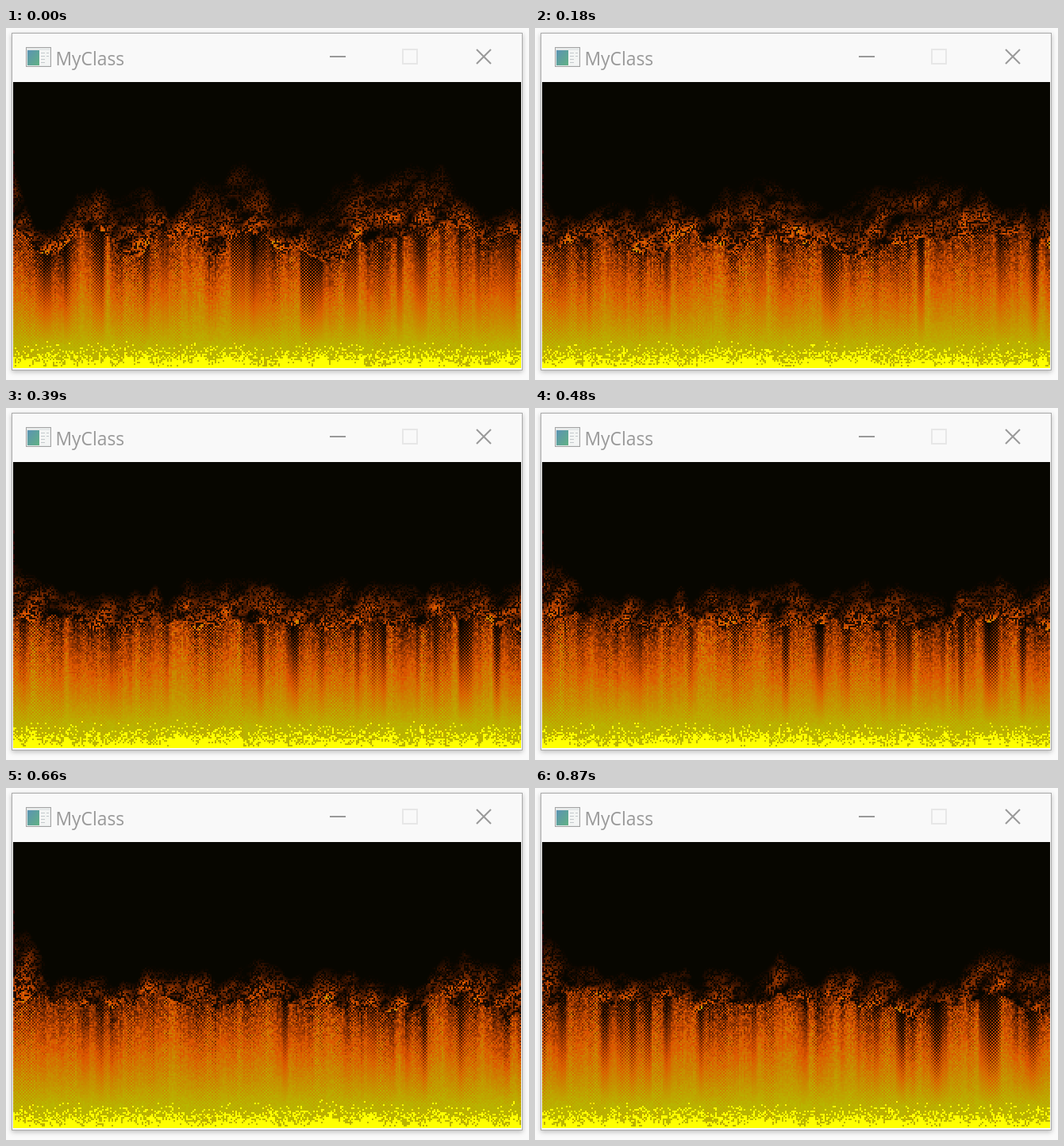
Write an HTML page with a canvas that moves like this. It is 659 px wide and 443 px high and loops after 0.9 s.

```html
<!DOCTYPE html>
<html lang="en">
<head>
<meta charset="utf-8">
<title>MyClass</title>
<style>
  html, body { margin: 0; width: 100%; height: 100%; overflow: hidden; background: #fafafa; }
  .stage { position: relative; width: 659px; height: 443px; overflow: hidden; }
  .window {
    position: absolute; left: 7px; top: 6px; width: 642px; height: 423px;
    background: #f9f9f9; border: 1px solid #aaa;
    box-shadow: 0 2px 6px rgba(0, 0, 0, .25);
  }
  svg, canvas { position: absolute; }
  svg { left: 0; top: 0; }
  canvas { left: 9px; top: 68px; width: 640px; height: 360px; image-rendering: pixelated; }
  text { font: 22.8px "Open Sans", "Noto Sans", sans-serif; fill: #999; }
</style>
</head>
<body>
<div class="stage">
  <div class="window"></div>
  <svg width="659" height="443" fill="none">
    <defs>
      <linearGradient id="pane" x1="0" y1="0" x2="1" y2="1">
        <stop offset="0" stop-color="#5b93b4"/>
        <stop offset="1" stop-color="#62b184"/>
      </linearGradient>
    </defs>
    <rect x="25.5" y="24.5" width="31" height="24" fill="#e6e9e9" stroke="#a4a4a4"/>
    <rect x="27" y="28" width="15" height="19" fill="url(#pane)"/>
    <rect x="42" y="28" width="13" height="19" fill="#f3f5f4"/>
    <path d="M44 31.5h5M44 35.5h5M44 39.5h5M44 43.5h5M51 31.5h3M51 35.5h3" stroke="#c4c9cc"/>
    <text x="62.5" y="47">MyClass</text>
    <path d="M408 36H428" stroke="#999" stroke-width="2"/>
    <rect x="500" y="27" width="18" height="18" stroke="#e7e7e7" stroke-width="2"/>
    <path d="M593 27L611 45M611 27L593 45" stroke="#999" stroke-width="2"/>
  </svg>
  <canvas id="fire" width="320" height="180"></canvas>
</div>
<script>
const W = 320, H = 180, LOOP = 900, STEP = 30;
const ctx = document.getElementById('fire').getContext('2d');
const image = ctx.createImageData(W, H);
const pixels = new Uint32Array(image.data.buffer);

const clamp = (v, lo = 0, hi = 1) => Math.min(hi, Math.max(lo, v));
const mix = (a, b, k) => a + (b - a) * k;
const smooth = k => k * k * (3 - 2 * k);
const rgb = (r, g, b) => (255 << 24 | b << 16 | g << 8 | r) >>> 0;

function hash(x, y, z = 0) {
  let h = Math.imul(x, 374761393) ^ Math.imul(y, 668265263) ^ Math.imul(z, 1274126177);
  h = Math.imul(h ^ h >>> 13, 1103515245);
  h = Math.imul(h ^ h >>> 16, 2246822519);
  return ((h ^ h >>> 15) >>> 0) / 4294967296;
}

function noise(x, y, seed) {
  const i = Math.floor(x), j = Math.floor(y), u = smooth(x - i), v = smooth(y - j);
  return mix(mix(hash(i, j, seed), hash(i + 1, j, seed), u),
             mix(hash(i, j + 1, seed), hash(i + 1, j + 1, seed), u), v);
}

// Black through brown and orange to olive, then a jump to yellow
const palette = Array.from({ length: 256 }, (_, n) => {
  const k = n / 255;
  if (k > .92) return rgb(255, 255, 0);
  if (k < .46) return rgb(mix(7, 222, k / .46), mix(6, 84, (k / .46) ** 1.2), 0);
  const u = clamp((k - .46) / .3);
  return rgb(mix(222, 185, u), mix(84, 182, u), 0);
});
const DARK_RED = rgb(45, 0, 0);

// Thin brown tufts that lean right and rise above the flame front
function tuftHeat(px, py, t, depth, reach, grain) {
  const fade = 1 + depth / reach;
  if (fade <= 0) return 0;
  const x = px + .5 * py + .08 * t, y = py + .11 * t;
  const clump = .65 * noise(x / 19, y / 17, 7) + .35 * noise(x / 7, y / 6, 8);
  const stipple = grain < .42 ? .15 : .45 + .85 * grain;
  return .48 * fade * (1.7 * clump - .25) * stipple;
}

function flameHeat(x, y, step, s, column, grain) {
  const loose = 1 - s;
  const checker = x + y + step & 1 ? .6 : -1;
  let heat = .23 + .52 * s ** .8;
  heat += column.streak * .26 * loose;
  heat += (grain - .5) * (.04 + .3 * loose * loose);
  heat += checker * column.dots * (.05 + .1 * loose);
  return heat - column.gap * loose * (.5 + grain - .5 * checker);
}

function render(step) {
  const t = step * STEP;
  pixels.fill(palette[0]);
  for (let x = 0; x < W; x++) {
    const px = 10 + 2 * x, drift = px + .05 * t;
    const edge = 271 + 34 * (noise(drift / 52, t / 600, 1) - .5)
                     + 20 * (noise(drift / 13, t / 230, 3) - .5);
    const reach = 28 + 75 * noise((px + .03 * t) / 42, t / 700, 4) ** 1.5;
    const column = {
      streak: noise(drift / 8, t / 400, 5) - .5 + .4 * (hash(x, 0, 6) - .5),
      dots: smooth(noise(drift / 9, t / 300, 9)),
      gap: .9 * Math.max(0, noise(drift / 11, t / 450, 11) - .6)
    };

    for (let y = 35; y < H; y++) {
      const py = 69 + 2 * y, depth = py - edge, grain = hash(x, y, step + 20);
      const s = clamp(depth / (400 - edge));
      let heat = depth < 0
        ? tuftHeat(px, py, t, depth, reach, grain)
        : Math.min(.9, flameHeat(x, y, step, s, column, grain));
      if (py > 392) {
        const glow = ((py - 392) / 33) ** 2 * (1 + column.streak);
        if (grain < glow || py > 425) heat = 1;
      }
      pixels[y * W + x] = palette[Math.round(clamp(heat) * 255)];
    }
  }
  for (let y = 42; y < 82; y++) if (hash(1, y, 2) < .45) pixels[y * W] = DARK_RED;
  ctx.putImageData(image, 0, 0);
}

const start = performance.now();
let shown = -1;
function tick() {
  const step = Math.floor((performance.now() - start) % LOOP / STEP);
  if (step !== shown) render(shown = step);
  requestAnimationFrame(tick);
}
tick();
</script>
</body>
</html>
```
